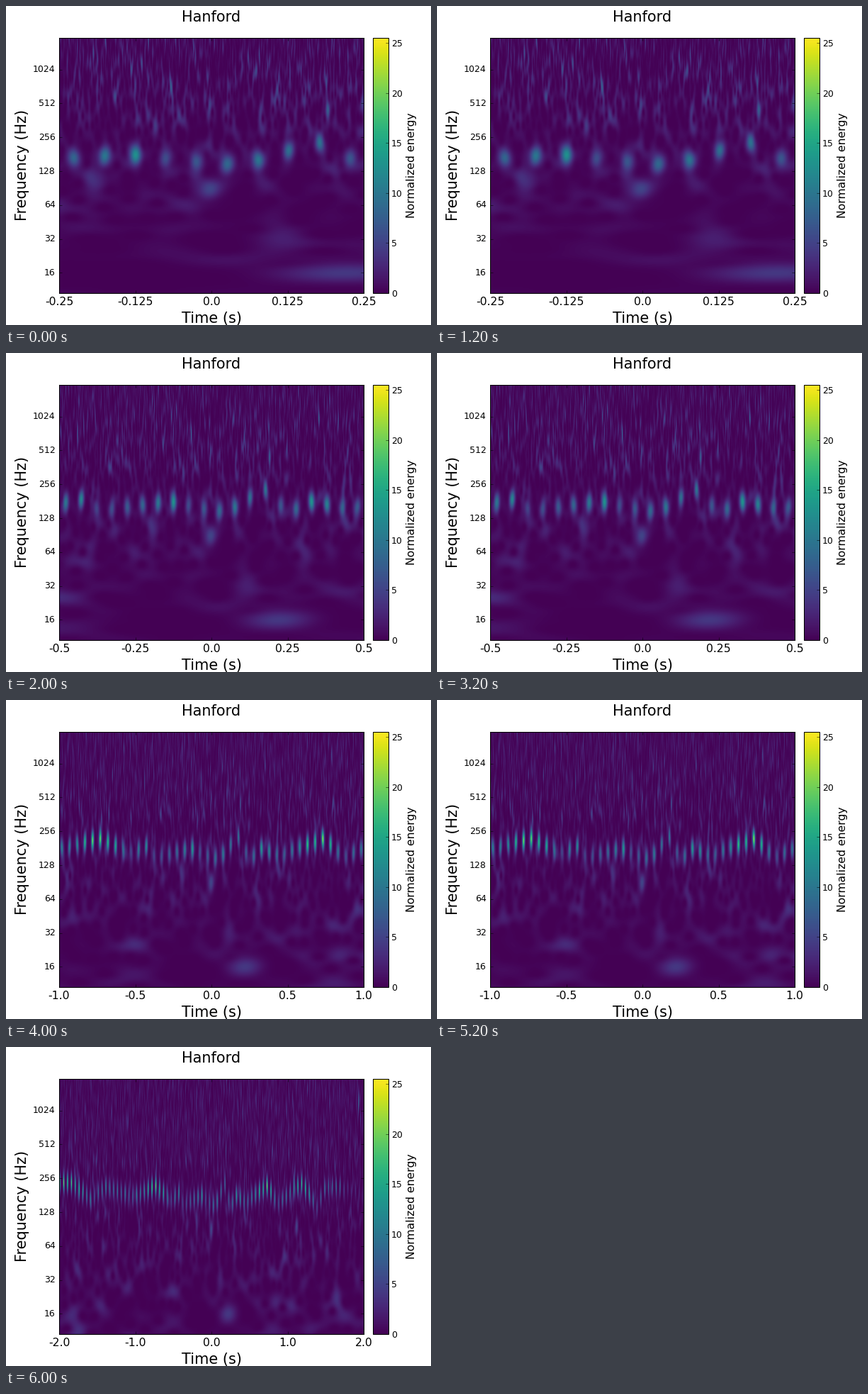
Animation, 600 px wide and 450 px high, one loop 8 s. Source, as a matplotlib script:

```python
import numpy as np
import matplotlib.pyplot as plt
from matplotlib.animation import FuncAnimation

WIDTH, HEIGHT, DPI = 600, 450, 75
SPANS = [0.25, 0.5, 1.0, 2.0]          # half-width of each time window, s
LOW, HIGH = 3.40, 10.936               # frequency limits, log2 Hz
ROWS, COLS, SUB = 360, 430, 2
RATE, SAMPLES = 8192, 32768

plt.rcParams.update({"font.family": "DejaVu Sans", "axes.linewidth": 1.0})
rng = np.random.default_rng(12)
octave = LOW + (np.arange(ROWS) + 0.5) * (HIGH - LOW) / ROWS

# Bursts recur at a fixed period; their pitch and strength wander
# between these turning points (time, Hz, peak energy).
BURST_OFFSET, BURST_PERIOD = 0.0262, 0.0504
TURNS = np.array([
    (-1.84, 235, 25), (-1.58, 165, 8), (-1.385, 215, 15), (-1.03, 175, 8),
    (-.73, 220, 25), (-.53, 165, 5), (-.43, 190, 14), (-.37, 150, 4),
    (-.125, 180, 12), (-.07, 165, 5), (.05, 143, 9), (.177, 230, 9),
    (.25, 140, 5), (.33, 180, 15), (.45, 155, 6), (.737, 220, 24),
    (.87, 150, 6), (1.185, 230, 24), (1.39, 140, 6), (1.5, 215, 14),
    (1.7, 215, 12), (1.76, 190, 2),
])
# Patches apart from the regular bursts: time, Hz, peak energy.
PATCHES = [(-.003, 88, 5), (-.19, 108, 3), (.191, 450, 6), (.222, 16, 4)]


def noise_energy():
    """Constant-Q energy of white noise, one row per frequency."""
    spectrum = rng.normal(size=SAMPLES) + 1j * rng.normal(size=SAMPLES)
    hz = np.arange(SAMPLES) * RATE / SAMPLES
    energy = np.empty((ROWS, SAMPLES), dtype=np.float32)
    for row, centre in enumerate(2 ** octave):
        window = np.exp(-((hz - centre) / (0.19 * centre)) ** 2)
        energy[row] = np.abs(np.fft.ifft(spectrum * window)) ** 2
        energy[row] /= energy[row].mean()
    level = np.interp(octave, [3.4, 6.5, 8, 8.5], [0.6, 0.5, 0.5, 0.85])
    return energy * level[:, None]


def burst_list():
    times = BURST_OFFSET + BURST_PERIOD * np.arange(-40, 40)
    hz = np.interp(times, TURNS[:, 0], TURNS[:, 1])
    peaks = np.interp(times, TURNS[:, 0], TURNS[:, 2])
    # strength gets less regular away from the centre
    peaks *= 1 - 0.4 * rng.random(len(times)) * np.minimum(1, np.abs(times))
    bursts = list(zip(times, hz, peaks)) + PATCHES
    slants = rng.uniform(-1.2, 1.2, len(bursts))
    return [(*burst, slant) for burst, slant in zip(bursts, slants)]


def spectrogram(span, noise, bursts):
    count = COLS * SUB
    time = ((np.arange(count) + 0.5) / count * 2 - 1) * span
    index = np.round((time + 2) * RATE).astype(int) % SAMPLES
    energy = noise[:, index].astype(float)
    for start, hz, peak, slant in bursts:
        offset = (octave - np.log2(hz))[:, None]
        lag = (time - start) * hz / 1.15 - slant * offset
        energy += peak * np.exp(-0.5 * (lag ** 2 + (offset / 0.19) ** 2))
    return energy.reshape(ROWS, COLS, SUB).mean(axis=2)


def pixel_axes(left, top, right, bottom):
    return fig.add_axes([left / WIDTH, 1 - bottom / HEIGHT,
                         (right - left) / WIDTH, (bottom - top) / HEIGHT])


def label(x, y, text, size, rotation=0):
    fig.text(x / WIDTH, 1 - y / HEIGHT, text, fontsize=size, rotation=rotation,
             ha="center", va="baseline", rotation_mode="anchor")


noise, bursts = noise_energy(), burst_list()
images = [spectrogram(span, noise, bursts) for span in SPANS]

fig = plt.figure(figsize=(WIDTH / DPI, HEIGHT / DPI), dpi=DPI, facecolor="white")
ax = pixel_axes(75, 45, 505, 405)
image = ax.imshow(images[0], origin="lower", aspect="auto", cmap="viridis",
                  vmin=0, vmax=25.5, extent=(-1, 1, LOW, HIGH),
                  interpolation="bilinear")
positions = [-1, -0.5, 0, 0.5, 1]
octaves = range(4, 11)
ax.set_yticks(octaves, [str(2 ** n) for n in octaves], va="center")
ax.tick_params(direction="in", top=True, right=True, length=4, width=0.5, pad=5)
ax.tick_params(axis="x", labelsize=15)
ax.tick_params(axis="y", labelsize=12)

bar = fig.colorbar(image, cax=pixel_axes(518, 45, 540, 405), ticks=range(0, 26, 5))
bar.ax.tick_params(direction="in", length=4, width=0.5, pad=4, labelsize=12)

label(290, 22, "Hanford", 20)
label(290, 446.5, "Time (s)", 20)
label(29, 224, "Frequency (Hz)", 20, 90)
label(577.5, 225, "Normalized energy", 15, 90)


def draw(frame):
    image.set_data(images[frame])
    ax.set_xticks(positions, [str(SPANS[frame] * p) for p in positions])
    return [image]


anim = FuncAnimation(fig, draw, frames=len(SPANS), interval=2000,
                     repeat=True, repeat_delay=0, blit=False)
plt.show()
```
